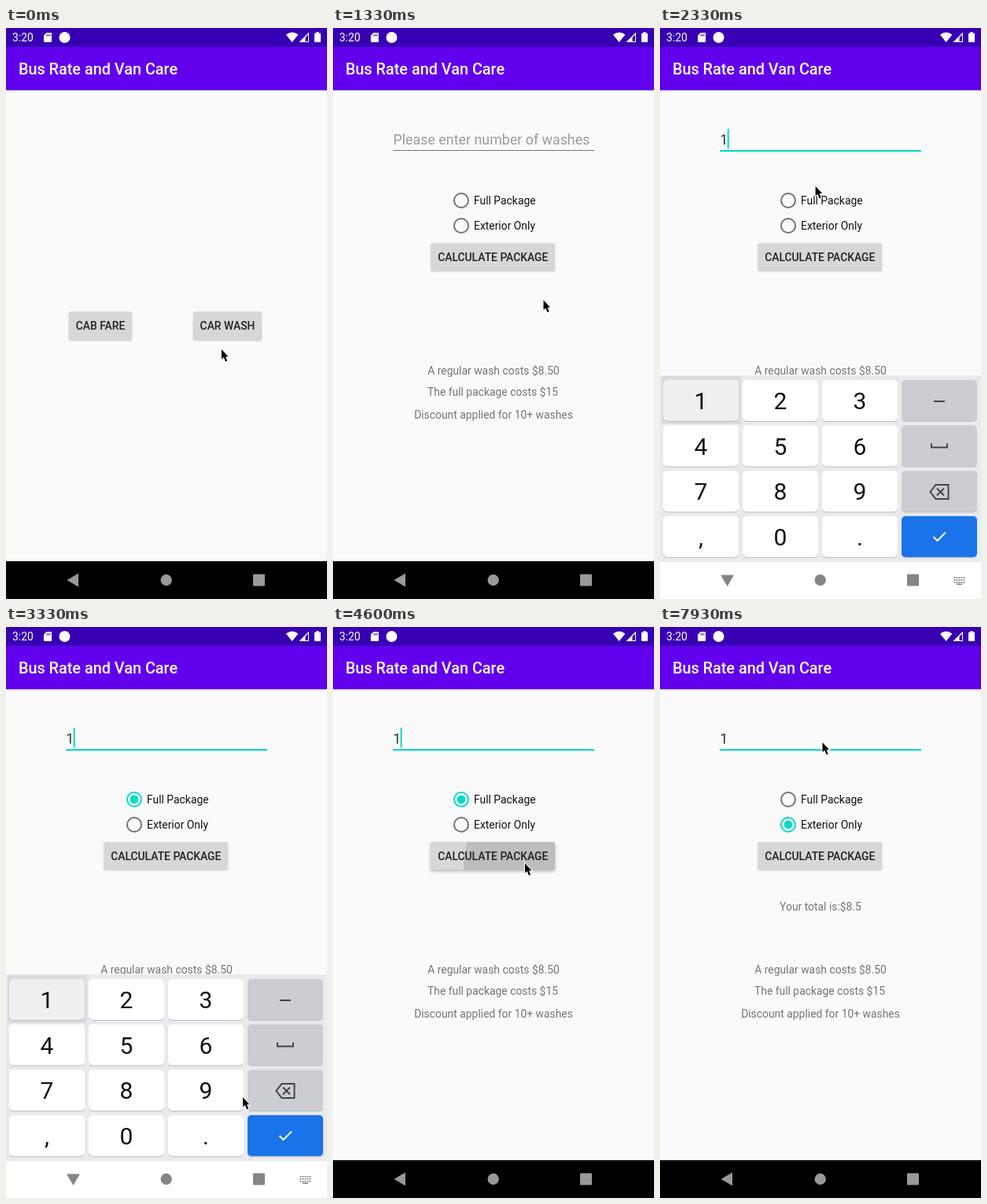
These frames come from a looping animation (408x725 px, 8000 ms). An HTML page:

```html
<!DOCTYPE html>
<html lang="en">
<head>
<meta charset="utf-8">
<title>Wash calculator</title>
<style>
  html, body { margin: 0; width: 100%; height: 100%; overflow: hidden; background: #fafafa; }
  svg { display: block; width: 408px; height: 725px; font: 13.88px Roboto, "Noto Sans", sans-serif; }
  .title { font-size: 19.83px; font-weight: 500; fill: #fff; }
  .field { font-size: 17.85px; }
  .label { font-weight: 500; fill: #212121; }
  .note { fill: #757575; }
  .mid { text-anchor: middle; }
  .digit { font-size: 30px; fill: #111; }
  .button { filter: drop-shadow(0 1px .8px rgba(0,0,0,.2)); }
  .button.down { filter: drop-shadow(0 2px 2px rgba(0,0,0,.3)); }
  .line { fill: none; stroke: #444; stroke-width: 2; }
</style>
</head>
<body>
<svg id="stage" viewBox="0 0 408 725"></svg>
<script>
const LOOP = 8000, STEP = 1000 / 15;
const TEAL = '#03dac5', GREY = '#737373';

// ---- markup helpers ----
const rect = (x, y, w, h, fill, more = '') =>
  `<rect x="${x}" y="${y}" width="${w}" height="${h}" fill="${fill}" ${more}/>`;
const text = (x, y, cls, str, more = '') =>
  `<text x="${x}" y="${y}" class="${cls}" ${more}>${str}</text>`;

const screen = (id, body) => `<g id="${id}">
  ${rect(0, 78, 408, 600, '#fafafa')}
  ${rect(0, 79, 408, 3, 'url(#fade)')}
  ${rect(0, 0, 408, 25, '#3700b3')}
  ${rect(0, 24, 408, 55, '#6200ee')}
  ${text(15.9, 59, 'title', 'Bus Rate and Van Care')}
  ${body}
  ${rect(0, 677, 408, 48, '#000')}</g>`;

const button = (id, x, y, w, h, label) => `<g id="${id}" class="button">
  <clipPath id="${id}Clip">${rect(x, y, w, h, '#000', 'rx="2"')}</clipPath>
  ${rect(x, y, w, h, '#d6d7d7', 'rx="2"')}
  <circle id="${id}Ripple" clip-path="url(#${id}Clip)" r="0"/>
  ${text(x + w / 2, y + 23, 'label mid', label)}</g>`;

const radio = (id, y, label) => `
  <circle id="${id}Halo" cx="163" cy="${y}" r="20" opacity="0"/>
  <circle id="${id}Ring" cx="163" cy="${y}" fill="none"/>
  <circle id="${id}Dot" cx="163" cy="${y}" r="0"/>
  ${text(179, y + 5, '', label, 'fill="#111"')}`;

function keys() {
  const faces = ['123-', '456_', '789<', ',0.ok'];
  let out = rect(2, 442, 101, 61, '#d9dbde');
  faces.forEach((row, j) => {
    for (let i = 0; i < 4; i++) {
      const x = 4 + i * 101, y = 447 + j * 57.6;
      const fill = i < 3 ? (i + j ? '#fff' : '#efefef') : j < 3 ? '#cbcdd2' : '#1a73e8';
      out += rect(x, y + 1, 96, 52, '#b9bbc0', 'rx="5"') +
        rect(x, y, 96, 52, fill, `rx="5" ${i + j === 6 ? 'id="okKey"' : ''}`);
      if (i < 3) out += text(x + 48, y + 37, 'digit mid', row[i]);
    }
  });
  return out + `
    <path class="line" d="M348 474h14M345 527.5v5h20v-5M350.5 580h16v18h-16l-7-9zM352 584.5l9 9m0-9l-9 9"/>
    <path class="line" d="M347.5 646l5 5 10.5-10.5" style="stroke:#fff"/>`;
}

const statusIcons = `<g fill="#fff">
  ${text(8, 17, '', '3:20')}
  <path d="M51.5 6H57q1 0 1 1v10q0 1-1 1h-8q-1 0-1-1V9.5z"/>
  <path d="M52 8v2.5M54 8v2.5M56 8v2.5" stroke="#3700b3"/>
  <circle cx="74.5" cy="12" r="7"/>
  <path d="M356 8.6q7.7-6.2 15.4 0L363.7 18z"/>
  <path d="M372.5 18L385 5.5V18zM380.5 12V17H384V8.5z" fill-rule="evenodd"/>
  <path d="M392 7.5q0-1 1-1h1.5V5h3v1.5h1.5q1 0 1 1V17q0 1-1 1h-6q-1 0-1-1z"/></g>`;

let dots = '';
for (let i = 0; i < 15; i++) dots += rect(373.5 + i % 5 * 3, 697 + (i / 5 | 0) * 3, 1.8, 1.8, 'inherit');
const navIcons = `<g id="nav">
  <path id="back" d="M77.5 701L92 692.5V709.5z"/>
  <circle cx="203.7" cy="701" r="7.2"/>
  <rect x="314" y="693.5" width="15" height="15" rx="1"/>
  <g id="switcher">${dots}<rect x="377" y="705.5" width="7" height="1.5"/></g></g>`
  .replaceAll('fill="inherit"', '');

document.getElementById('stage').innerHTML = `
  <defs><linearGradient id="fade" x2="0" y2="1">
    <stop stop-opacity=".13"/><stop offset="1" stop-opacity="0"/></linearGradient></defs>
  ${screen('home', button('cab', 80, 360, 80, 36, 'CAB FARE') + button('car', 238, 360, 87, 36, 'CAR WASH'))}
  ${rect(0, 0, 408, 725, '#000', 'id="dim"')}
  ${screen('wash', `
    ${text(76.5, 147.5, 'field', 'Please enter number of washes', 'id="hint" fill="#9b9b9b"')}
    ${text(76.3, 147.5, 'field', '1', 'id="entry" fill="#333"')}
    ${rect(76, 155, 256, 1, GREY, 'id="under"')}
    ${rect(76, 128, 2, 25, TEAL, 'id="caret"')}
    ${radio('full', 219, 'Full Package')}
    ${radio('ext', 251, 'Exterior Only')}
    ${button('calc', 124.5, 273, 157.5, 35, 'CALCULATE PACKAGE')}
    ${text(204, 359.5, 'note mid', '', 'id="total"')}
    ${text(204, 440, 'note mid', 'A regular wash costs $8.50')}
    ${text(203, 467, 'note mid', 'The full package costs $15')}
    ${text(204, 496, 'note mid', 'Discount applied for 10+ washes')}`)}
  <g id="ime">${rect(0, 441, 408, 238, '#e8eaed')}${keys()}${rect(0, 678, 408, 48, '#fff')}</g>
  ${statusIcons}${navIcons}
  <path id="mouse" d="M0 0V12.5L2.8 10L5 15.5L7.2 14.5L5 9.2H8.5z" stroke="#fff" stroke-width="2" paint-order="stroke"/>`;

const $ = id => document.getElementById(id);
const set = (id, attrs) => { for (const k in attrs) $(id).setAttribute(k, attrs[k]); };
const show = (id, on) => set(id, { visibility: on ? 'inherit' : 'hidden' });

// ---- easing ----
const clamp = v => Math.min(1, Math.max(0, v));
const part = (t, start, length) => clamp((t - start) / length);
const mix = (a, b, p) => a + (b - a) * p;
const cubic = (s, a, b, c, d) => {
  const r = 1 - s;
  return r * r * r * a + 3 * r * r * s * b + 3 * r * s * s * c + s * s * s * d;
};
function curve(p, xs, ys) {
  let lo = 0, hi = 1;
  for (let i = 0; i < 24; i++) {
    const s = (lo + hi) / 2;
    if (cubic(s, ...xs) < p) lo = s; else hi = s;
  }
  return cubic(lo, ...ys);
}
const standard = p => curve(p, [0, .4, .2, 1], [0, 0, 1, 1]);
const extraSlow = p => p < 1 / 6
  ? curve(p, [0, .05, .1333, .1667], [0, 0, .06, .4])
  : curve(p, [.1667, .2083, .25, 1], [.4, .82, 1, 1]);

// ---- pointer: time, x, y, eased ----
const path = [
  [0, 274, 408], [267, 281, 386.5], [1135, 281, 386.5], [1880, 204, 152, 1], [2070, 204, 152],
  [2400, 196, 213], [2467, 196, 219], [2533, 195, 222], [2790, 195, 222], [3333, 301, 597, 1],
  [3467, 328, 635], [3790, 328, 635], [4333, 245, 300, 1], [4400, 244, 300], [5060, 244, 300],
  [5067, 244, 299], [5200, 244, 299], [5733, 229, 250, 1], [6200, 229, 250], [6333, 233.5, 263.5],
  [6733, 240, 292], [7467, 240, 292], [7933, 206.5, 146.5, 1], [LOOP, 206.5, 146.5]
];
function pointer(t) {
  const i = Math.max(1, path.findIndex(k => k[0] >= t));
  const [t0, x0, y0] = path[i - 1], [t1, x1, y1, eased] = path[i];
  let p = part(t, t0, t1 - t0);
  if (eased) p = p * p * (3 - 2 * p);
  return [mix(x0, x1, p), mix(y0, y1, p)];
}

// ---- controls ----
function press(id, t, start, release, fade, [cx, cy]) {
  const down = t >= start && t < release + fade;
  set(id + 'Ripple', {
    cx, cy, r: down ? 30 + (t - start) * .8 : 0,
    opacity: .12 * (1 - part(t, release, fade))
  });
  $(id).classList.toggle('down', down);
}

function drawRadio(id, t, on, off, pressAt) {
  const checked = t >= on && t < off;
  const p = part(t, t >= off ? off : on, 300);
  let hole = 8, dot = 0;
  if (checked) {
    hole = p < .25 ? mix(8, 0, p / .25) : 8;
    dot = p < .25 ? 0 : mix(2, 5.4, part(p, .25, .2));
  } else if (t >= off) {
    const q = part(p, .3, .7);
    hole = p < .3 ? 8 : 8 * q * (2 - q);
    dot = p < .3 ? 5.4 * (1 - p / .3) : 0;
  }
  const color = checked ? TEAL : GREY;
  set(id + 'Ring', { r: (10 + hole) / 2, 'stroke-width': 10 - hole, stroke: color });
  set(id + 'Dot', { r: dot, fill: color });
  const halo = part(t, pressAt - 60, 120) * (1 - part(t, pressAt + 150, 140));
  set(id + 'Halo', { opacity: .12 * halo });
}

const zoom = s => `translate(204 362.5) scale(${s}) translate(-204 -362.5)`;

function draw(t) {
  set('mouse', { transform: `translate(${pointer(t)})` });

  // screen change
  const open = extraSlow(part(t, 735, 400));
  show('home', t < 1135);
  set('home', { transform: zoom(mix(1, 1.05, open)) });
  set('dim', { opacity: .2 * open });
  show('wash', t > 735);
  set('wash', { transform: zoom(mix(.85, 1, open)), opacity: part(t, 785, 50) });

  // number field
  const focus = t >= 1930, typed = t >= 2230;
  const blink = Math.floor((t - 2230) / 500) % 2 === 0;
  show('hint', !typed);
  show('entry', typed);
  show('caret', focus && (!typed || blink));
  set('caret', { x: typed ? 85.7 : 76 });
  set('under', { height: focus ? 2 : 1, fill: focus ? TEAL : GREY });

  drawRadio('full', t, 2790, 6190, 2670);
  drawRadio('ext', t, 6190, Infinity, 6000);

  press('car', t, 455, 735, 400, [281, 386]);
  if (t < 5500) press('calc', t, 4540, 4700, 150, [244, 300]);
  else press('calc', t, 6810, 7200, 60, [240, 292]);
  $('total').textContent = t < 4700 ? '' : 'Your total is:$' + (t < 7050 ? '15.5' : '8.5');

  // on-screen keyboard
  const rise = part(t, 2030, 285), fall = part(t, 3640, 285);
  const up = standard(rise) - standard(fall);
  const shown = rise > 0 && fall < 1;
  show('ime', shown);
  set('ime', {
    transform: `translate(0 ${284 * (1 - up)})`,
    opacity: Math.min(1, .55 + rise, 1.55 - fall)
  });
  set('okKey', { fill: t > 3500 && t < 3640 ? '#1765cc' : '#1a73e8' });
  const turn = part(t, 2030, 200) - part(t, 3640, 200);
  set('back', { transform: `rotate(${-90 * turn} 85.5 701)` });
  set('nav', { fill: shown ? '#858585' : '#999' });
  show('switcher', t >= 2000 && t < 3860);
}

const begin = performance.now();
function tick() {
  const t = (performance.now() - begin) % LOOP;
  draw(Math.floor(t / STEP + .06) * STEP);
  requestAnimationFrame(tick);
}
tick();
</script>
</body>
</html>
```
